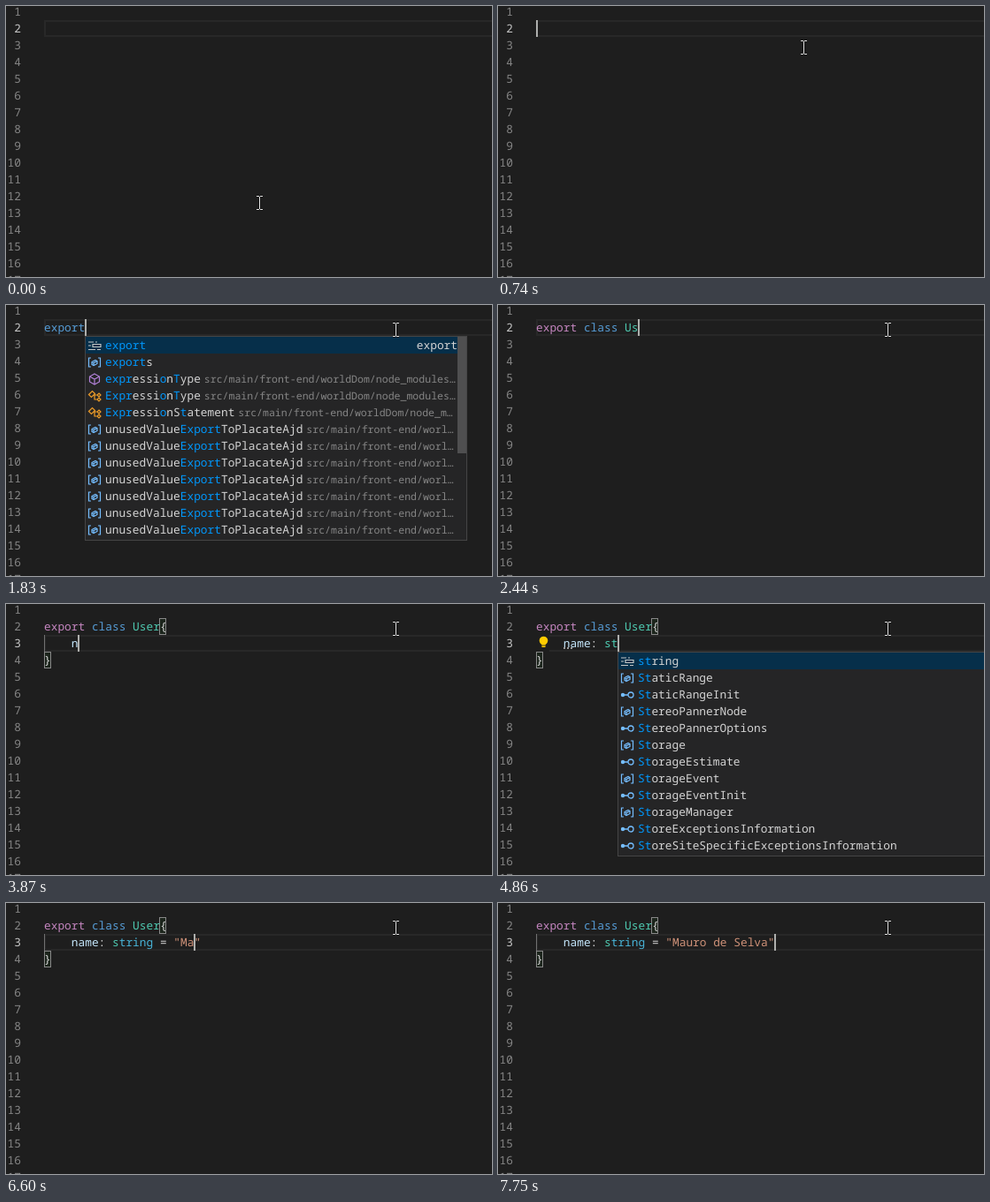
Recreate the animation shown at these times as an HTML page. Size 549 px wide and 307 px high, loop 8000 ms.

```html
<!DOCTYPE html>
<html lang="en">
<head>
<meta charset="utf-8">
<title>Typing a class</title>
<style>
  html, body { margin: 0; width: 100%; height: 100%; overflow: hidden; background: #1e1e1e; }
  svg { display: block; width: 549px; height: 307px; }
  text { font-family: "Noto Sans Mono", monospace; white-space: pre; text-rendering: geometricPrecision; }
</style>
</head>
<body>
<svg id="stage" viewBox="0 0 549 307"></svg>
<script>
(() => {
const LOOP = 8000, LEFT = 43, CHAR = 7.7, ROW = 19, BLINK = 254;
const FONT = CHAR / 0.6, SMALL = FONT * 0.9;
const C = {
  plain: '#d4d4d4', name: '#9cdcfe', prop: '#c4e6fb', flow: '#c586c0', keyword: '#569cd6',
  type: '#4ec9b0', prim: '#48b4d8', string: '#ce9178', match: '#0097fb', dim: '#858585'
};
const stage = document.getElementById('stage');

// Typed text and the moment of each key
const line2 = 'export class User{';
const keys2 = [1470, 1540, 1610, 1670, 1730, 1790, 1880, 1960, 2010, 2060, 2110, 2160, 2220,
  2340, 2440, 2490, 2570, 2990];
const ENTER = 3120;
const line3 = 'name: string = "Mauro de Selva"';
const keys3 = [3870, 3960, 4050, 4150, 4330, 4450, 4600, 4720, 4880, 4950, 5000, 5060, 5130,
  5690, 5870, 6070, 6490, 6600,
  ...Array.from({ length: 12 }, (_, i) => 6870 + i * 630 / 11), 7750];
const keys = [-315, ...keys2, ENTER, ...keys3];

// Pointer path: time, x, y
const pointer = [[0, 286, 223], [20, 286, 223], [180, 288, 237], [480, 335, 130], [820, 348, 22],
  [980, 392, 33], [1110, 445, 30], [1200, 440, 28]];

const path = 'src/main/front-end/worldDom/node_modules';
const exportItems = [
  ['keyword', 'export'], ['variable', 'exports'],
  ['cube', 'expressionType', path + '…'], ['class', 'ExpressionType', path + '…'],
  ['class', 'ExpressionStatement', path.slice(0, 34) + '…'],
  ...Array(7).fill(['variable', 'unusedValueExportToPlacateAjd', path.slice(0, 23) + '…'])
];
const stringItems = [
  ['keyword', 'string'], ['variable', 'StaticRange'], ['interface', 'StaticRangeInit'],
  ['variable', 'StereoPannerNode'], ['interface', 'StereoPannerOptions'], ['variable', 'Storage'],
  ['interface', 'StorageEstimate'], ['variable', 'StorageEvent'], ['interface', 'StorageEventInit'],
  ['variable', 'StorageManager'], ['interface', 'StoreExceptionsInformation'],
  ['interface', 'StoreSiteSpecificExceptionsInformation']
];
const popups = [
  { from: 1830, to: 1880, line: 2, col: 6, word: 0, items: exportItems, alt: 'exprot', detail: 'export', scroll: true },
  { from: 2080, to: 2220, line: 2, col: 10, word: 7, items: [['keyword', 'class']] },
  { from: 2460, to: 2570, line: 2, col: 15, word: 13, items: [['variable', 'User']] },
  { from: 3900, to: 4150, line: 3, col: 5, word: 4, items: [['variable', 'name'], ['keyword', 'namespace']] },
  { from: 4860, to: 5130, line: 3, col: 12, word: 10, items: stringItems }
];

const rowY = line => 16 + (line - 2) * ROW;
const colX = col => LEFT + col * CHAR;
const count = (times, t) => times.filter(k => k <= t).length;
const esc = s => s.replace(/&/g, '&amp;').replace(/</g, '&lt;');
const text = (x, y, s, fill, size = FONT, anchor = 'start') =>
  `<text x="${x}" y="${y}" fill="${fill}" font-size="${size}" text-anchor="${anchor}">${esc(s)}</text>`;
const rect = (x, y, w, h, fill, extra = '') =>
  `<rect x="${x}" y="${y}" width="${w}" height="${h}" fill="${fill}" ${extra}/>`;
const stroke = (d, color, width = 1.2) =>
  `<path d="${d}" fill="none" stroke="${color}" stroke-width="${width}"/>`;

const icons = {
  keyword: stroke('M-7-4h6M1-4h2M-7 0h3M-2-1.5h9v3h-9zM-7 4.5h8M3 4.5h4', '#c5c5c5'),
  variable: stroke('M-4-5h-2.5v10h2.5M4-5h2.5v10h-2.5M-3-.5l4-2 2 1v3l-4 2-2-1zM-3-.5l2 1 4-2M-1 .5v3', '#75beff'),
  cube: stroke('M0-6l5.5 3v6l-5.5 3-5.5-3v-6zM-5.5-3l5.5 3 5.5-3M0 0v6', '#b180d7'),
  class: stroke('M-6.5-1.5l4-4 3 3-4 4zM-1-1h4M0-1v5h3M5-3l2 2-2 2-2-2zM5 2l2 2-2 2-2-2z', '#ee9d28'),
  interface: '<circle cx="-5" r="2.2" fill="#75beff"/>' + stroke('M-4 0h5M7 0a3 3 0 1 1-6 0a3 3 0 1 1 6 0', '#75beff', 1.3)
};

// Indices of the letters of q in label, or null
function matches(label, q) {
  const low = label.toLowerCase(), at = low.indexOf(q);
  if (at >= 0) return [...q].map((_, i) => at + i);
  const found = [];
  let pos = -1;
  for (const ch of q) {
    pos = low.indexOf(ch, pos + 1);
    if (pos < 0) return null;
    found.push(pos);
  }
  return found;
}

function popup(p, t) {
  const typed = p.line === 2 ? line2.slice(0, count(keys2, t)) : '    ' + line3.slice(0, count(keys3, t));
  const q = typed.slice(p.word).trim().toLowerCase();
  const rows = p.items
    .map(([icon, label, note]) => ({ icon, label, note, hits: matches(label, q) || (p.alt && matches(label, p.alt)) }))
    .filter(r => r.hits);
  const x = Math.floor(colX(p.col)), y = rowY(p.line) + ROW;
  let out = rect(x + .5, y + .5, 431, rows.length * ROW + 3, '#252526', 'stroke="#454545"');
  out += rect(x + 1, y + 1, 430, ROW, '#062f4a');
  rows.forEach((r, i) => {
    const ry = y + 1 + i * ROW, tx = x + 23;
    out += `<g transform="translate(${x + 11} ${ry + 10})">${icons[r.icon]}</g>`;
    const spans = [...r.label].map((ch, j) =>
      `<tspan fill="${r.hits.includes(j) ? C.match : C.plain}">${ch}</tspan>`).join('');
    out += `<text x="${tx}" y="${ry + 14}" font-size="${FONT}">${spans}</text>`;
    if (r.note) out += text(tx + r.label.length * CHAR + 4, ry + 14, r.note, C.dim, SMALL);
  });
  if (p.detail) out += text(x + 421, y + 15, p.detail, C.plain, FONT, 'end');
  if (p.scroll) out += rect(x + 421, y + 1, 10, 132, '#4f4f50');
  return out;
}

// Draw tokens [start, end, colour] of the typed part of a line
function tokens(line, indent, s, list) {
  return list.map(([a, b, fill]) => {
    const part = s.slice(a, b);
    return part ? text(colX(indent + a), rowY(line) + 14, part, fill) : '';
  }).join('');
}

const bracketBox = (line, col) =>
  rect(Math.floor(colX(col)) + .5, rowY(line) + .5, 7, 18, '#1c251c', 'stroke="#888"');

function bulb() {
  return rect(43, 35, 15, 19, '#1e1e1e') +
    '<circle cx="51.5" cy="41.5" r="4.8" fill="#ffcc00"/>' +
    rect(49.5, 45, 4, 4, '#ffcc00') + stroke('M49.5 47h4', '#1e1e1e', .8);
}

function beam(t) {
  let i = 0;
  while (i < pointer.length - 2 && t >= pointer[i + 1][0]) i++;
  const [t0, x0, y0] = pointer[i], [t1, x1, y1] = pointer[i + 1];
  const k = Math.min(1, (t - t0) / (t1 - t0));
  const x = Math.round(x0 + (x1 - x0) * k) + .5, y = Math.round(y0 + (y1 - y0) * k);
  const d = 'M-3.5-7.5h3M.5-7.5h3M0-7v14M-3.5 7.5h3M.5 7.5h3';
  return `<g transform="translate(${x} ${y})">${stroke(d, '#111', 2.6)}${stroke(d, '#e4e4e4', 1)}</g>`;
}

function draw(t) {
  const n2 = count(keys2, t), n3 = count(keys3, t);
  const s2 = line2.slice(0, n2), s3 = line3.slice(0, n3);
  const active = t < ENTER ? 2 : 3;
  const hinted = t >= 4150 && t < 5260;
  let out = rect(0, 0, 549, 307, '#1e1e1e');

  out += rect(LEFT + 1, rowY(active) + 1, 512, ROW - 2, 'none', 'stroke="#282828" stroke-width="2"');
  for (let i = 1; i <= 17; i++)
    out += text(17, rowY(i) + 14, String(i), i === active ? '#c6c6c6' : C.dim, FONT, 'end');

  if (n2 === line2.length) {
    const [line, col] = active === 2 ? [2, 18] : [4, 0];
    out += bracketBox(2, 17) + bracketBox(line, col) + text(colX(col), rowY(line) + 14, '}', C.plain);
  }
  out += tokens(2, 0, s2, [
    [0, 6, n2 > 6 ? C.flow : n2 === 6 ? C.keyword : C.name],
    [7, 12, n2 >= 12 ? C.keyword : C.name],
    [13, 17, C.type], [17, 18, C.plain]
  ]);

  if (active === 3) {
    out += rect(LEFT, 35, 1, ROW, '#707070');
    const open = n3 >= 16 && n3 < line3.length;
    out += tokens(3, 4, s3 + (open ? '"' : ''), [
      [0, 4, C.prop], [4, 5, C.plain], [6, 7, C.type],
      [7, 12, n3 >= 12 ? C.prim : C.type],
      [13, 14, C.plain], [15, 40, C.string]
    ]);
  }
  if (hinted) {
    out += bulb();
    for (const x of [74, 78, 82]) out += rect(x, 49, 2, 2, '#9a9a9a');
  }

  const last = keys[count(keys, t) - 1];
  if (Math.floor((t - last) / BLINK) % 2 === 0)
    out += rect(Math.floor(colX(active === 2 ? n2 : 4 + n3)), rowY(active), 2, ROW, '#aeafad');

  for (const p of popups) if (t >= p.from && t < p.to) out += popup(p, t);
  stage.innerHTML = out + beam(t);
}

let start;
function tick(now) {
  start ??= now;
  draw((now - start) % LOOP);
  requestAnimationFrame(tick);
}
draw(0);
requestAnimationFrame(tick);
})();
</script>
</body>
</html>
```
